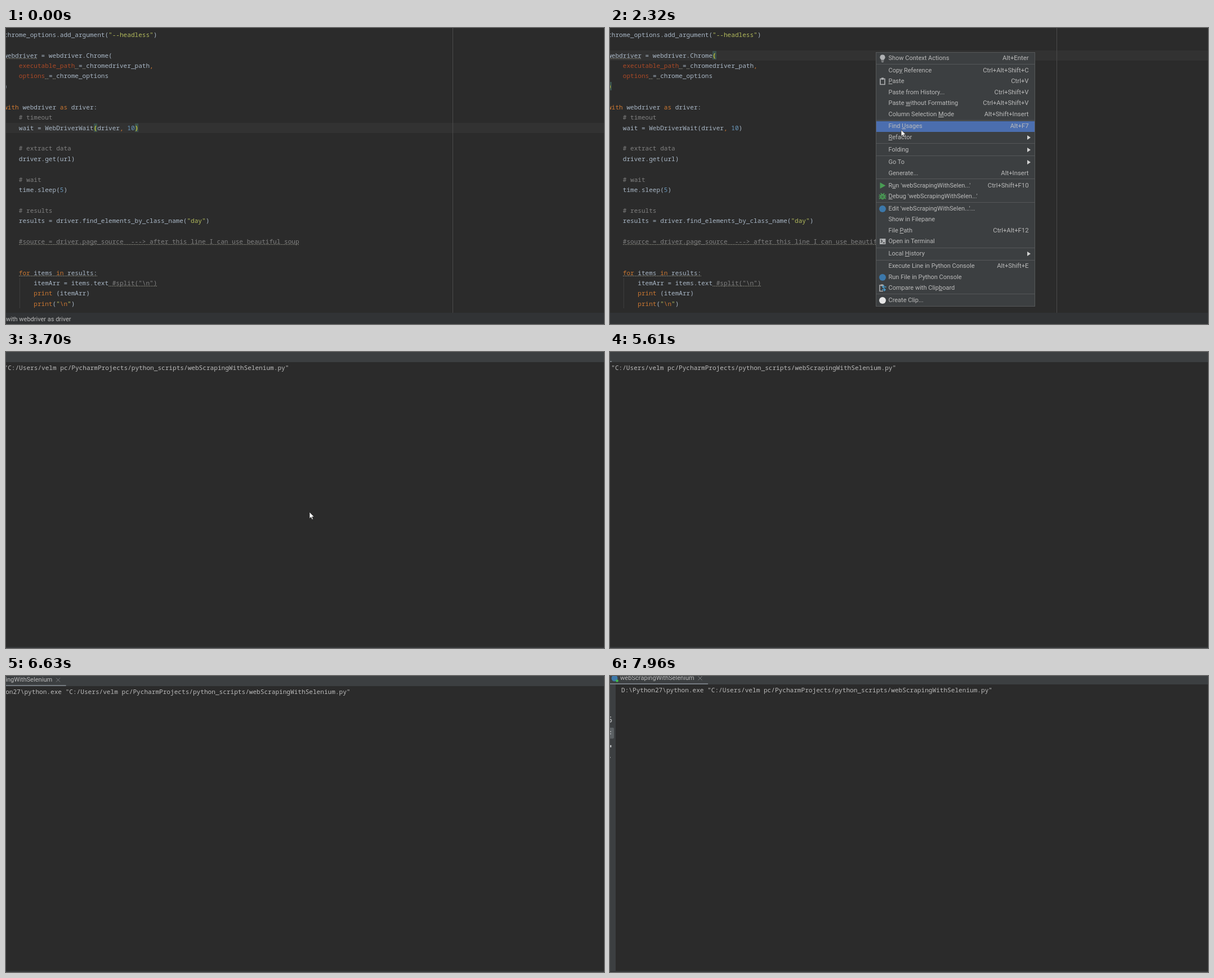
An HTML page for the animation above (8000 ms loop, 1062x527 px).

```html
<!DOCTYPE html>
<html lang="en">
<head>
<meta charset="utf-8">
<title>Running a scraping script</title>
<style>
html, body { margin: 0; width: 100%; height: 100%; overflow: hidden; background: #2b2b2b; }
#stage { position: relative; width: 1062px; height: 527px; overflow: hidden; background: #2b2b2b;
  font: 11px/20px Roboto, "Open Sans", sans-serif; color: #bbb; }
#stage div, #stage pre, #stage svg { position: absolute; margin: 0; }
#stage div { white-space: nowrap; }

/* every animation shares the same 8 s clock */
.line, .on1, .on2, .crumb, #menu, #bar, #run, #cmd, #cursor {
  animation: 8s step-end infinite; }

/* editor */
.line { left: 0; top: 168.5px; width: 1062px; height: 18.4px; background: #323232; animation-name: line; }
@keyframes line { 0% { top: 168.5px } 15.6%, 100% { top: 39.5px } }
.margin { left: 793px; top: 0; width: 1px; height: 507px; background: #4b4b4b; }
.guide { left: 24px; top: 445px; width: 1px; height: 54px; background: #3d3d3d; }
.code { left: -3.8px; top: 2.8px; color: #a9b7c6;
  font: 11.07px/18.415px "Noto Sans Mono", "DejaVu Sans Mono", monospace; font-variant-ligatures: none; }
.code b, .code i { font-weight: normal; font-style: normal; }
.k { color: #cc7832; }
.s { color: #b3bb5c; }
.n { color: #6897bb; }
.c { color: #808080; }
.a { color: #aa4926; }
.u { background: repeating-linear-gradient(90deg, #85857a 0 2px, transparent 2px 3px) 0 calc(100% - 1px) / 100% 1px no-repeat; }
.on1 { animation-name: on1; }
.on2 { animation-name: on2; }
@keyframes on1 { 0% { color: #ffef28; background: #3b514d } 15.6%, 100% { color: #a9b7c6; background: none } }
@keyframes on2 { 0% { color: #a9b7c6; background: none } 15.6%, 100% { color: #ffef28; background: #3b514d } }
.foot { left: 0; top: 507px; width: 1062px; height: 20px; background: #313335; }
.crumb { left: 0; top: 2px; animation-name: crumb; }
@keyframes crumb { 0% { opacity: 1 } 15.6%, 100% { opacity: 0 } }

/* context menu */
#menu { left: 471.5px; top: 42.5px; width: 281px; height: 451px; background: #3c3f41;
  border: 1px solid #565859; animation-name: menu; }
@keyframes menu { 0% { opacity: 0 } 20.6% { opacity: 1 } 43%, 100% { opacity: 0 } }
#menu .label { left: 22px; }
#menu .key { right: 10px; font-size: 11.3px; }
#menu .sep { left: 0; width: 281px; height: 1px; background: #555759; }
#menu .sub { right: 7px; border: solid transparent; border-width: 4px 0 4px 6px; border-left-color: #d2d2d2; }
#menu svg { left: 3px; width: 16px; height: 16px; }
#bar { left: 0; width: 281px; height: 19.4px; background: #4b6eaf; animation-name: bar; }
@keyframes bar {
  0% { top: 0; opacity: 0 } 24.1% { top: 1px; opacity: 1 } 24.6% { top: 22.5px; opacity: 1 } 25.35% { top: 42px }
  26.1% { top: 61.5px } 26.8% { top: 81px } 27.6% { top: 100.5px } 28.4% { top: 122px }
  29.2% { top: 141.5px } 30.2% { top: 163.5px } 31.3% { top: 185.5px } 32.2% { top: 205.5px }
  33.2%, 100% { top: 227.5px; opacity: 1 }
}

/* run console */
#run { left: 0; top: 0; width: 1062px; height: 527px; overflow: hidden; background: #2b2b2b; animation-name: run; }
@keyframes run { 0% { opacity: 0 } 44.6%, 100% { opacity: 1 } }
#panX, #panY { left: 0; top: 0; }
#panX { animation: panX 8s infinite; }
@keyframes panX {
  0%, 69.56% { transform: translateX(-176.6px); animation-timing-function: cubic-bezier(.333, .573, .667, .907) }
  100% { transform: translateX(.85px) }
}
#panY { animation: panY 8s linear infinite; }
@keyframes panY {
  0%, 70.2% { transform: translateY(0) } 72.5% { transform: translateY(4px) }
  75% { transform: translateY(5.5px) } 79.5% { transform: translateY(3.2px) }
  82.87% { transform: translateY(0) } 87.5% { transform: translateY(-2.5px) }
  91%, 100% { transform: translateY(-3px) }
}
.head { left: -40px; top: -20px; width: 1320px; height: 38px; background: #3c3f41; }
.tab { left: -8px; top: 15.5px; width: 181.5px; height: 2.5px; background: #747a80; }
.title { left: 18px; top: -3px; font-size: 11.1px; }
#cmd { left: 20px; top: 19px; color: #bbb; font: 11.1px/18.4px "Noto Sans Mono", "DejaVu Sans Mono", monospace;
  animation-name: cmd; }
@keyframes cmd { 0% { opacity: 0 } 46.2%, 100% { opacity: 1 } }
.edge { left: 0; top: 525px; width: 1062px; height: 2px; background: #353739; }
.tools { left: -30px; top: 0; }
.close { left: 0; top: 0; }

#cursor { left: 0; top: 0; animation-name: cursor; animation-timing-function: linear; }
@keyframes cursor {
  0%, 2.1% { transform: translate(966px, 532px); animation-timing-function: cubic-bezier(.3, .4, .5, 1) }
  12.5%, 12.8% { transform: translate(473px, 61px) }
  14.4% { transform: translate(476px, 32px) }
  16.2%, 23.75% { transform: translate(472px, 43px) }
  29% { transform: translate(517px, 181px) }
  33.6% { transform: translate(535px, 278px); animation-timing-function: step-end }
  34.25%, 54% { transform: translate(539px, 285px) }
  58.4%, 100% { transform: translate(425px, -16px) }
}
</style>
</head>
<body>
<div id="stage">
  <div class="line"></div>
  <div class="margin"></div>
  <div class="guide"></div>
  <pre class="code">chrome_options.add_argument(<b class="s">"--headless"</b>)

<b class="u">webdriver</b> = webdriver.Chrome<b class="on2">(</b>
    <b class="a">executable_path</b><b class="u"> </b>=<b class="u"> </b>chromedriver_path<b class="k">,</b>
    <b class="a">options</b><b class="u"> </b>=<b class="u"> </b>chrome_options
<b class="on2">)</b>

<b class="k">with</b> webdriver <b class="k">as</b> driver:
    <b class="c"># timeout</b>
    wait = WebDriverWait<b class="on1">(</b>driver<b class="k">,</b> <b class="n">10</b><b class="on1">)</b>

    <b class="c"># extract data</b>
    driver.get(url)

    <b class="c"># wait</b>
    time.sleep(<b class="n">5</b>)

    <b class="c"># results</b>
    results = driver.find_elements_by_class_name(<b class="s">"day"</b>)

    <b class="c u">#source = driver.page_source  ---&gt; after this line I can use beautiful soup</b>


    <b class="u"><i class="k">for</i> items <i class="k">in</i> results:</b>
        itemArr = items.text<b class="c u"> #split("\n")</b>
        <b class="k">print</b> (itemArr)
        <b class="k">print</b>(<b class="s">"<i class="k">\n</i>"</b>)</pre>
  <div class="foot"><div class="crumb">with webdriver as driver</div></div>

  <div id="menu"><div id="bar"></div></div>

  <div id="run">
    <div id="panX"><div id="panY">
      <div class="head"></div>
      <div class="tab"></div>
      <svg class="tools" width="60" height="540">
        <path d="M0 18H40V540H0Z" fill="#3c3f41"/>
        <circle cx="38" cy="7" r="5.5" fill="#3c78aa"/>
        <circle cx="42.5" cy="11.5" r="2.3" fill="#3fc04a"/>
        <rect x="14" y="95" width="23" height="19.5" rx="2" fill="#5c6164"/>
        <g fill="none" stroke="#afb1b3" stroke-width="1.5">
          <path d="M24 76H32M24 80H30a2.5 2.5 0 0 1 0 5H26M24 102H32M24 106H32"/>
          <path d="M22 128H32.5" stroke-width="4"/>
          <path d="M24 148H31"/>
        </g>
      </svg>
      <div class="title">webScrapingWithSelenium</div>
      <svg class="close" width="180" height="16"><path d="M156.5 3.5l7 7m0-7l-7 7" stroke="#7c7f81"/></svg>
      <div id="cmd">D:\Python27\python.exe "C:/Users/velm pc/PycharmProjects/python_scripts/webScrapingWithSelenium.py"</div>
    </div></div>
    <div class="edge"></div>
  </div>

  <svg id="cursor" width="10" height="15" overflow="visible">
    <path d="M0 0V11.5L2.7 9.1 4.5 13.2 6.4 12.4 4.6 8.4H8.2Z" fill="#fff" stroke="#222" stroke-width=".7"/>
  </svg>
</div>
<script>
const dot = color => `<circle cx="8" cy="8" r="6" fill="${color}"/>`;
const icons = {
  bulb: '<path d="M8 1.5a4.6 4.6 0 0 0-2.6 8.4V11h5.2V9.9A4.6 4.6 0 0 0 8 1.5ZM5.6 12h4.8v1H5.6ZM6.3 14h3.4v1H6.3Z" fill="#afb1b3"/>',
  paste: '<path d="M4 3.5H12V13.5H4Z" fill="none" stroke="#afb1b3" stroke-width="1.6"/><path d="M6 1.5H10V5H6Z" fill="#afb1b3"/>',
  play: '<path d="M3.5 2L13.5 7.5 3.5 13Z" fill="#499c54"/>',
  bug: '<ellipse cx="8" cy="8.5" rx="3.8" ry="5" fill="#499c54"/><path d="M2 5l12 7M2 12l12-7M1.5 8.5h13M5 2l2 3m4-3L9 5" stroke="#499c54" stroke-width="1.5"/><path d="M6 7.5h4M6 10h4" stroke="#3c3f41"/>',
  python: dot("#3c78aa"),
  term: '<path d="M3 3H13.5V13H3Z" fill="#afb1b3"/><path d="M5 5l2.5 2.5L5 10M8.5 10.5H12" fill="none" stroke="#3c3f41" stroke-width="1.3"/>',
  compare: '<path d="M10 3H3V13.5H9" fill="none" stroke="#afb1b3" stroke-width="1.6"/><path d="M5 1.5H9V4.5H5Z" fill="#afb1b3"/><path d="M14.5 6H8m3-3L8 6l3 3M7 11h6m-2.5-2.5L13 11l-2.5 2.5" fill="none" stroke="#4a9bc9" stroke-width="1.5"/>',
  web: dot("#e6e6e6")
};

// [centre y, label (& marks the mnemonic), shortcut or ">", icon]
const items = [
  [53.5, "Show Context Actions", "Alt+Enter", "bulb"],
  [75.5, "Cop&y Reference", "Ctrl+Alt+Shift+C"],
  [95, "&Paste", "Ctrl+V", "paste"],
  [114.5, "Paste from History...", "Ctrl+Shift+V"],
  [134, "Paste &without Formatting", "Ctrl+Alt+Shift+V"],
  [153.5, "Column Selection &Mode", "Alt+Shift+Insert"],
  [175, "Find &Usages", "Alt+F7"],
  [194.5, "&Refactor", ">"],
  [216.5, "Folding", ">"],
  [238.5, "Go To", ">"],
  [258.5, "Generate...", "Alt+Insert"],
  [280.5, "R&un 'webScrapingWithSelen...'", "Ctrl+Shift+F10", "play"],
  [300, "&Debug 'webScrapingWithSelen...'", "", "bug"],
  [322, "Edit 'webScrapingWithSelen...'...", "", "python"],
  [341, "Show in Filepane", ""],
  [360.5, "File &Path", "Ctrl+Alt+F12"],
  [380, "Open in Terminal", "", "term"],
  [402, "Local &History", ">"],
  [424, "Execute Line in Python Console", "Alt+Shift+E"],
  [443.5, "Run File in Python Console", "", "python"],
  [463, "Compare with Clip&board", "", "compare"],
  [484.5, "Create Clip...", "", "web"]
];
const seps = [64.5, 164, 205, 227.5, 268.5, 310, 391, 413, 473.5];

const menu = document.getElementById("menu");
const top0 = 43.5;
const add = (cls, y, html = "") =>
  menu.insertAdjacentHTML("beforeend", `<div class="${cls}" style="top:${y - top0}px">${html}</div>`);

for (const y of seps) add("sep", y - 0.5);
for (const [y, label, key, icon] of items) {
  add("label", y - 10, label.replace(/&(.)/, "<u>$1</u>"));
  if (key === ">") add("sub", y - 4);
  else if (key) add("key", y - 10, key);
  if (icon) menu.insertAdjacentHTML("beforeend",
    `<svg viewBox="0 0 16 16" style="top:${y - 8 - top0}px">${icons[icon]}</svg>`);
}
</script>
</body>
</html>
```
